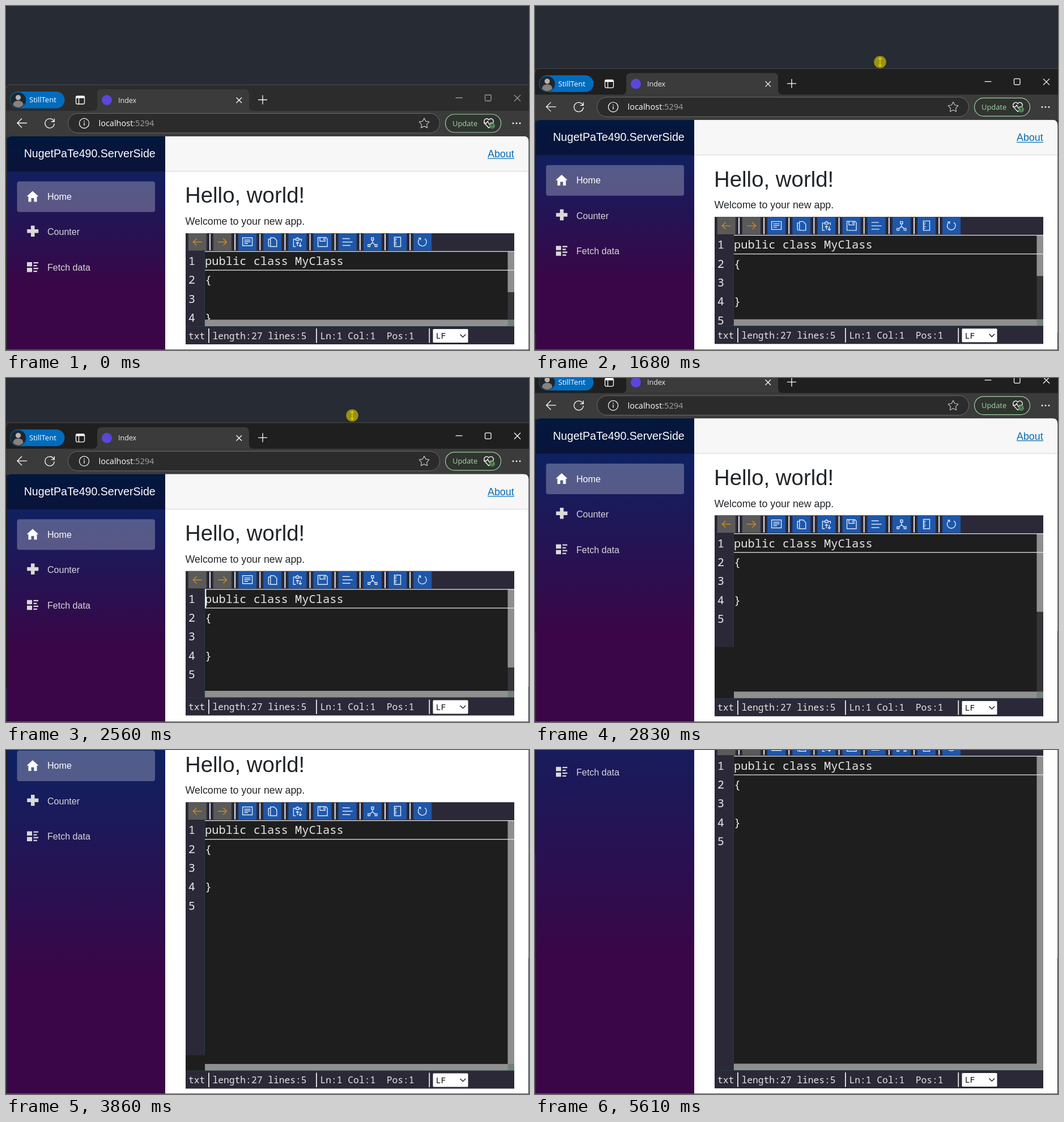
An HTML page for the animation above (5870 ms loop, 923 px wide and 607 px high).

```html
<!DOCTYPE html>
<html lang="en">
<head>
<meta charset="utf-8">
<title>Resizing editor</title>
<style>
  html, body { margin: 0; width: 100%; height: 100%; overflow: hidden; background: #272b34; }
  svg { display: block; width: 100%; height: 100%; --strip: #2c2c2c; --caption: #9a9a9a; }
  text { white-space: pre; }
  .ui { font-family: "Open Sans", "Noto Sans", sans-serif; }
  .page { font-family: "Liberation Sans", sans-serif; }
  .code { font-family: "Noto Sans Mono", monospace; }
  .line { fill: none; stroke: #fff; stroke-width: 1.3; }
  .tool { fill: none; stroke: #dce8f8; stroke-width: 1.4; }
</style>
</head>
<body>
<svg id="stage" viewBox="0 0 923 607" preserveAspectRatio="none"></svg>
<script>
const LOOP = 5870;
const stage = document.getElementById('stage');

const text = (x, y, size, fill, str, font) =>
  `<text class="${font}" x="${x}" y="${y}" font-size="${size}" fill="${fill}">${str}</text>`;
const rect = (x, y, w, h, fill, more = '') =>
  `<rect x="${x}" y="${y}" width="${w}" height="${h}" fill="${fill}" ${more}/>`;
const line = (d, more = '') => `<path class="line" d="${d}" ${more}/>`;
const circle = (x, y, r, fill, more = '') =>
  `<circle cx="${x}" cy="${y}" r="${r}" fill="${fill}" ${more}/>`;

function titleBar() {
  return `
    <path d="M0 607V147q0-8 8-8H923V607z" fill="var(--strip)"/>
    <path d="M0 147q0-8 8-8H923" fill="none" stroke="#4b4c50"/>
    ${rect(0, 185, 923, 46, '#3b3b3b')}
    <path d="M153 185q8 0 8-8V155q0-8 8-8H421q8 0 8 8V177q0 8 8 8z" fill="#3b3b3b"/>
    ${rect(7, 151, 96.5, 29.5, '#006cbe', 'rx="14.7"')}
    ${circle(21.5, 166, 13.7, '#22252b')}
    ${circle(21.5, 161.5, 4.6, '#b5b3b0')}
    <path d="M12.5 175q0-8 9-8t9 8q-9 8-18 0z" fill="#85827f"/>
    ${text(41, 170.3, 13, '#fff', 'StillTent', 'ui')}
    ${line('M126 159h10q2.5 0 2.5 2.500v9q0 2.500-2.500 2.500h-10q-2.500 0-2.500-2.500v-9q0-2.500 2.500-2.500zM128.500 161v12')}
    ${rect(124, 159, 14, 3.6, '#fff')}
    ${circle(178, 166, 9, '#5a46dc')}
    ${text(198, 170.5, 12.5, '#f0f0f0', 'Index', 'ui')}
    ${line('M406.500 161.500l9.500 9.500m0-9.500l-9.500 9.500M445 165.500h16m-8-8v16')}
    <g style="stroke:var(--caption)" fill="none" stroke-width="1.3">
      <path d="M793.500 162h12M897 157l11 11m0-11l-11 11"/>
      <rect x="845.500" y="157" width="10.500" height="10.500" rx="1.500"/>
    </g>`;
}

function addressBar() {
  const star = Array.from({ length: 10 }, (_, i) => {
    const a = i * Math.PI / 5, r = i % 2 ? 4.8 : 9.4;
    return `${(738 + r * Math.sin(a)).toFixed(1)},${(207.3 - r * Math.cos(a)).toFixed(1)}`;
  }).join(' ');
  return `
    ${line('M20 206.500h17M28 198.500l-8 8 8 8', 'stroke-width="1.500"')}
    ${line('M84.500 203.500a8.200 8.200 0 1 0 .8 4M85.300 198.500v5.500h-5.500')}
    <rect id="address" x="109.5" y="189.5" width="656" height="34.5" rx="17.2" fill="#2b2b2b" stroke="#6c6c6c"/>
    ${circle(138, 207, 8.6, 'none', 'stroke="#fff" stroke-width="1.2"')}
    ${line('M138 205.500v5.500M138 202.300v1.600')}
    <text class="ui" x="163.5" y="212" font-size="14.5" fill="#fff">localhost<tspan fill="#a6a6a6">:5294</tspan></text>
    <polygon points="${star}" fill="none" stroke="#c4c4c4" stroke-width="1.2" stroke-linejoin="round"/>
    ${rect(775.5, 191, 98, 32, '#30342f', 'rx="16" stroke="#9fd0a2" stroke-width="1.2"')}
    ${text(788, 211.5, 12.9, '#a3d5a6', 'Update', 'ui')}
    ${line('M852 215l-7-7.500q-3-5 1-8 4-2 6 1.500 2-3.500 6-1.500 4 3 1 8zM843 206.500h5l2-3 3.500 6 2-3h4')}
    ${circle(858, 211.5, 5, '#4f8a55')}
    ${line('M858 208.500v3.500m0 1.300v1', 'style="stroke:#1d3320"')}
    ${[895, 901, 907].map(x => circle(x, 207, 1.4, '#fff')).join('')}`;
}

function pageTop() {
  const nav = (y, name, fill) => text(73, y, 16.06, fill, name, 'page');
  return `
    <path d="M281 1200V230H914q8 0 8 8V1200z" fill="#fff"/>
    <path d="M281 292V230H914q8 0 8 8V292z" fill="#f7f7f7"/>
    ${rect(281, 291, 641, 1, '#d6d5d5')}
    <path id="side" fill="url(#night)"/>
    <path d="M2 292V238q0-8 8-8H281V292z" fill="rgba(0,0,0,.4)"/>
    ${text(31.7, 267, 19.6, '#fff', 'NugetPaTe490.ServerSide', 'page')}
    ${rect(19.5, 309.5, 243.5, 54, 'rgba(255,255,255,.27)', 'rx="4"')}
    <path d="M47 326.500L36.500 336H39.500V345.500H44.500V339H49.500V345.500H54.500V336H57.500z" fill="#fff"/>
    <path d="M44 387.500h6.500v6.500h6.800v6.500h-6.800v6.500H44v-6.500h-6.800v-6.500H44z" fill="#d9d9d9"/>
    <path d="M37 452h9v7.500h-9zM37 462h9v7.500h-9zM48.500 452h8.500v2.300h-8.500zM48.500 457h6v2.300h-6zM48.500 462h8.500v2.300h-8.500zM48.500 467h6.500v2.300h-6.500z" fill="#d9d9d9"/>
    ${nav(342, 'Home', '#fff')}${nav(404.3, 'Counter', '#d7d7d7')}${nav(467, 'Fetch data', '#d7d7d7')}
    ${text(850, 267, 17.84, '#006bb7', 'About', 'page')}
    ${rect(850, 268.5, 47, 1.2, '#006bb7')}
    ${text(316, 347.3, 38.4, '#212529', 'Hello, world!', 'page')}
    ${text(316.5, 386, 17.84, '#212529', 'Welcome to your new app.', 'page')}`;
}

// Icons are drawn around the centre of their button.
const ICONS = [
  'M8 0H-7.500M-1.500-6l-6 6 6 6',
  'M-8 0H7.500M1.500-6l6 6-6 6',
  'M-8.500-7.500h17v14h-17zM-5.500-3.500H5.500M-5.500-.500H5.500M-5.500 2.500H1',
  'M-3.500-7.500H3l4.500 4.500V8H-3.500zM-3.500-5H-7V5.500q0 2.500 2 2.500',
  'M-3 8H-7V-5H-4M4-5H7V-1M-3-3V-6h1.500q1.500-4 3 0H3v3zM0 7V0m-2.500 2.500L0 0l2.500 2.500M5 1v7m-2.500-2.500L5 8l2.500-2.500',
  'M-8-8H6l2.500 2.500V8H-8zM-4.500-8v6.500H4.500V-8M2-6.500v3',
  'M-9-6H4M-9 0H9M-9 6H5',
  'M0-3.500V1M0 1l-5 4.500M0 1l5 4.500M-2-7.500h4v4h-4zM-8 4.500h3.500V8H-8zM4.500 4.500H8V8H4.500z',
  'M-5.500-8.500h11v16.500h-11zM-5.500-5h4M-5.500-2h3M-5.500 1.500h4M-5.500 4.500h3',
  'M-4-6.500A7.300 7.300 0 1 0 4-6M-7-7h3.500v3.500'
];

function editor() {
  const pitch = 44.15;
  const tools = ICONS.map((d, i) => {
    const x = 321.8 + i * pitch, off = i < 2;
    const gap = i ? rect(x - 7, 402, 2, 29, '#e8e8e8') : '';
    return gap + rect(x, 401, 32, 30.5, off ? '#5a5a5a' : '#1f57a9') +
      `<path class="tool" d="${d}" transform="translate(${x + 16} 416.500)" ${off ? 'style="stroke:#cd8a24"' : ''}/>`;
  }).join('');
  const row = n => 457 + (n - 1) * 33.35;
  const numbers = [1, 2, 3, 4, 5].map(n => text(321.7, row(n), 20.4, '#e6e6e6', n, 'code')).join('');
  const source = { 1: 'public class MyClass', 2: '{', 4: '}' };
  const code = Object.keys(source).map(n => text(351, row(n), 20.4, '#e6e6e6', source[n], 'code')).join('');
  return `
    ${rect(317, 401, 580, 800, '#1e1e1e')}
    ${rect(317, 401, 580, 32, '#2b2937')}
    ${tools}
    <g id="gutter">${rect(317, 433, 33, 1, '#2b2937')}${rect(349.5, 433, 1.5, 1, '#223b42')}</g>
    ${numbers}${code}
    ${rect(885.5, 433, 11.5, 800, '#353439')}
    <rect id="thumb" x="885.5" y="433" width="11.5" fill="#8f8f8f"/>
    ${rect(351, 432.5, 546, 1.3, '#e4e4e4')}${rect(351, 465.5, 546, 1.3, '#e4e4e4')}
    <rect id="caret" x="351.2" y="433" width="2" height="33" fill="#fff"/>`;
}

function statusBar() {
  const label = (x, str) => text(x, 587.5, 16.3, '#e6e6e6', str, 'code');
  return `
    ${rect(351, 553.5, 535, 12, '#8f8f8f')}
    <rect id="corner" x="885.5" y="553.5" width="11.5" height="12"/>
    ${rect(317, 565.5, 580, 32, '#2b2937')}
    ${rect(317, 565, 580, 1, '#223b42')}
    ${[357, 547, 746.3].map(x => rect(x, 569, 1.8, 25.5, '#e8e8e8')).join('')}
    ${label(322, 'txt')}${label(364.5, 'length:27 lines:5')}${label(554.5, 'Ln:1 Col:1  Pos:1')}
    ${rect(753.5, 570, 62, 24, '#fff', 'rx="1.5"')}
    ${text(758.5, 587.3, 15.2, '#111', 'LF', 'code')}
    <path d="M801.500 579.500l4.800 4.800 4.800-4.800" fill="none" stroke="#222" stroke-width="1.500"/>
    ${rect(281, 597, 641, 20, '#fff')}`;
}

stage.innerHTML = `
  <defs><linearGradient id="night" x2="0" y2="1">
    <stop stop-color="#052767"/><stop offset=".7" stop-color="#3a0647"/>
  </linearGradient></defs>
  ${rect(0, 0, 923, 607, '#272b34')}
  <g id="win">${titleBar()}${addressBar()}${pageTop()}${editor()}</g>
  <g id="status">${statusBar()}</g>
  <g id="frame">${rect(0, 606, 923, 1, '#5c5c5c')}${rect(922, 240, 1, 367, '#6a6a6a')}</g>
  <path id="arrow" d="M0 0V16l3.700-3.400 2.400 5 2.400-1.100-2.300-4.900H11.500z" fill="#fff" stroke="#000" stroke-width=".8"/>
  <g id="resize">
    <circle id="press" r="10.800" fill="#98920f"/>
    <path id="grip" d="M0-7.500V7.500M-3-4.500L0-7.500 3-4.500M-3 4.500L0 7.500 3 4.500" fill="none" stroke-width="1.500"/>
  </g>`;

const el = {};
stage.querySelectorAll('[id]').forEach(n => el[n.id] = n);

// Rows of time followed by values, joined by straight lines.
function track(keys, t) {
  let i = keys.findIndex(k => k[0] > t);
  if (i < 0) return keys[keys.length - 1].slice(1);
  if (i === 0) return keys[0].slice(1);
  const a = keys[i - 1], b = keys[i], p = (t - a[0]) / (b[0] - a[0]);
  return a.slice(1).map((v, j) => v + (b[j + 1] - v) * p);
}
const since = (steps, t) => steps.filter(s => s[0] <= t).pop()[1];

// time, window shift, status bar shift
const SHIFT = [
  [1420, 0, 0], [1490, -6, 0], [1680, -28.5, -.7], [1750, -38, -1], [1880, -51, -1.2],
  [2090, -60.2, -1.5], [2620, -60.2, -1.5], [2720, -95, -.5], [2860, -175, 0], [3000, -245, .5],
  [3130, -271, .5], [3720, -271, .5], [3850, -304, .5], [3990, -362, .5], [4120, -404, .5],
  [4250, -420.7, .5], [4799, -420.7, .5], [4800, -422.3, 0]
];
// time, pointer x, pointer y
const POINTER = [
  [70, 796, 494], [200, 765, 420], [340, 700, 310], [480, 630, 215], [620, 598, 155],
  [689, 598, 155], [690, 598, 141], [890, 598, 139], [1400, 598, 139], [1520, 603, 123],
  [1680, 609, 99], [1880, 611, 83], [2090, 611, 81], [2559, 611, 81], [2560, 611, 66],
  [2625, 611, 66], [2760, 613, -14], [2800, 613, -40]
];
const GUTTER = [[0, 200], [3450, 414], [4600, 800]];
const THUMB = [[0, 72], [2290, 138], [3450, 479], [4600, 800]];
const BLINK = [1090, 1620, 2090, 2620, 3100, 3580, 4100, 4600, 5070, 5610];

function draw(t) {
  const [y, low] = track(SHIFT, t);
  const [px, py] = track(POINTER, t);
  const active = t >= 1090;

  el.win.setAttribute('transform', `translate(0 ${y})`);
  el.status.setAttribute('transform', `translate(0 ${low})`);
  el.side.setAttribute('d', `M2 ${606 - y}V238q0-8 8-8H281V${606 - y}z`);
  el.frame.lastElementChild.setAttribute('y', Math.max(0, 238 + y));
  stage.style.setProperty('--strip', active ? '#1f1f1f' : '#2c2c2c');
  stage.style.setProperty('--caption', active ? '#fff' : '#9a9a9a');

  for (const bar of el.gutter.children) bar.setAttribute('height', since(GUTTER, t));
  el.thumb.setAttribute('height', since(THUMB, t));
  el.corner.setAttribute('fill', t < 4600 ? '#73817a' : '#8f8f8f');
  el.caret.setAttribute('opacity', BLINK.filter(b => b <= t).length % 2);

  const hover = t >= 70 && t < 690 && py > 189 && py < 224;
  el.address.setAttribute('fill', hover ? '#363636' : '#2b2b2b');
  el.arrow.setAttribute('opacity', t >= 70 && t < 690 ? 1 : 0);
  el.arrow.setAttribute('transform', `translate(${px} ${py})`);
  el.resize.setAttribute('opacity', t >= 690 && t < 2800 ? 1 : 0);
  el.resize.setAttribute('transform', `translate(${px} ${py})`);
  el.press.setAttribute('opacity', active ? 1 : 0);
  el.grip.setAttribute('stroke', active ? '#f0c21c' : '#fff');
}

const start = performance.now();
function tick() {
  draw((performance.now() - start) % LOOP);
  requestAnimationFrame(tick);
}
tick();
</script>
</body>
</html>
```
